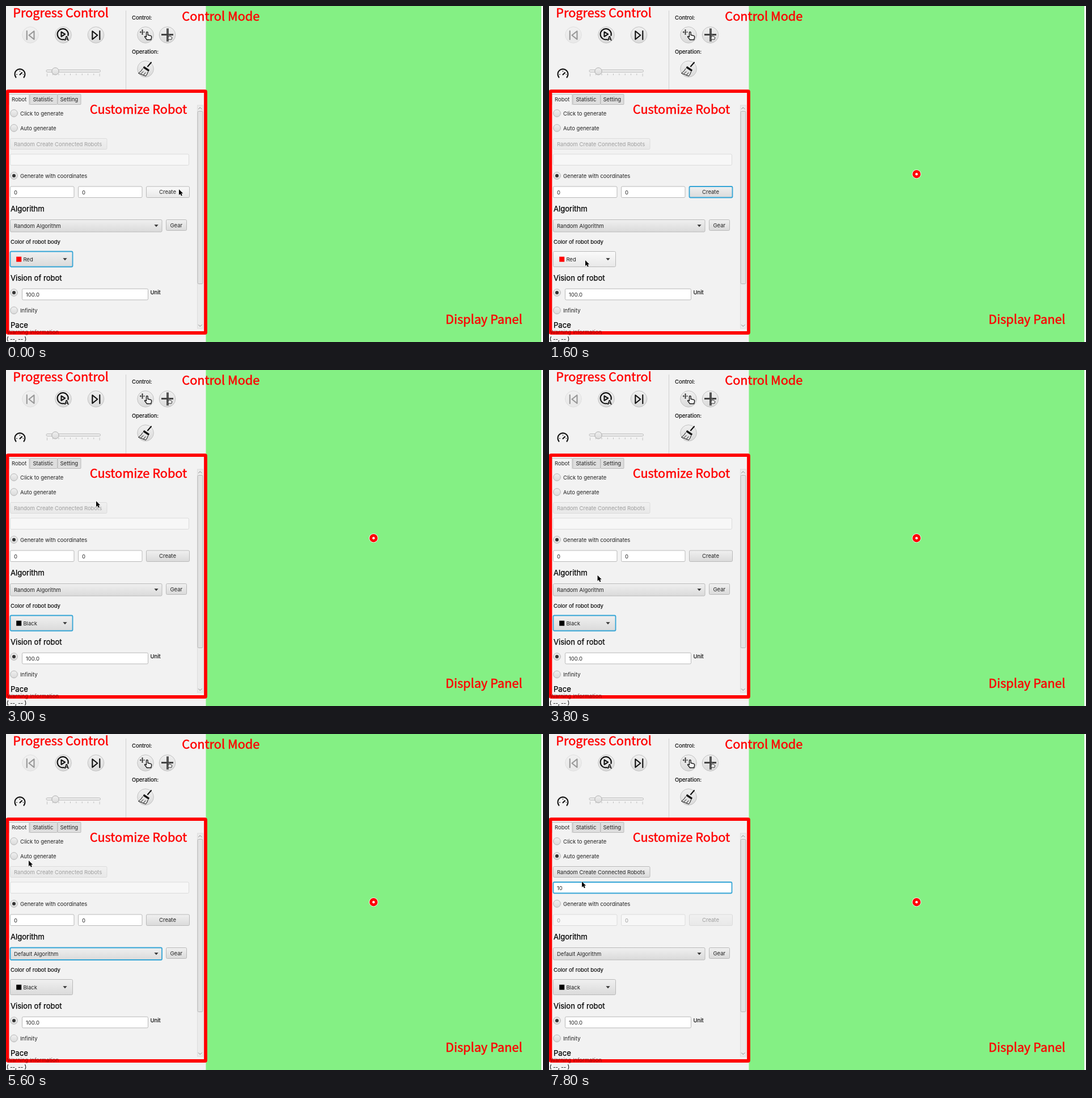
An HTML page for the animation above (8000 ms loop, 947 by 592 pixels).

```html
<!DOCTYPE html>
<html lang="en">
<head>
<meta charset="utf-8">
<title>Robot control panel</title>
<style>
  html, body { margin: 0; width: 100%; height: 100%; overflow: hidden; background: #f2f2f2; }
  svg { display: block; width: 100%; height: 100%; }
  text { font: 9.5px Inter, Roboto, sans-serif; fill: #222; white-space: pre; }
  .label { fill: #000; stroke: #000; stroke-width: .15; }
  .head { font-size: 13.1px; fill: #000; stroke: #000; stroke-width: .25; }
  .note { font: 21.7px "Noto Sans CJK SC", "Noto Sans CJK JP", "Noto Sans CJK", "Open Sans", sans-serif; fill: #f00; stroke: #f00; stroke-width: .5; }
  .mid { text-anchor: middle; }
  .off { opacity: .4; }
  .lit { fill: #fff; }
  .ink { fill: none; stroke: #111; stroke-width: 2.1; stroke-linejoin: round; stroke-linecap: round; }
  .thin { stroke-width: 1; }
  .pale { stroke: #888; stroke-width: 1; }
</style>
</head>
<body>
<svg viewBox="0 0 947 592">
  <defs>
    <linearGradient id="face" x2="0" y2="1"><stop stop-color="#f0f0f0"/><stop offset="1" stop-color="#dadada"/></linearGradient>
    <linearGradient id="hot" x2="0" y2="1"><stop stop-color="#fafafa"/><stop offset="1" stop-color="#e8e8e8"/></linearGradient>
    <linearGradient id="down" x2="0" y2="1"><stop stop-color="#e2e2e2"/><stop offset="1" stop-color="#d0d0d0"/></linearGradient>
    <linearGradient id="popup" x2="0" y2="1"><stop stop-color="#f6f6f6"/><stop offset=".6" stop-color="#ececec"/><stop offset=".75" stop-color="#f5f5f5"/><stop offset="1" stop-color="#e2e2e2"/></linearGradient>
    <filter id="shade" x="-10%" y="-10%" width="125%" height="125%"><feDropShadow dx="0" dy="2" stdDeviation="3" flood-opacity=".4"/></filter>
  </defs>
  <g id="base"></g>
  <g id="form"></g>
  <g id="robot">
    <circle cx="648.2" cy="296.2" r="8" fill="#fff"/>
    <circle cx="648.2" cy="296.2" r="7.2" fill="#f00"/>
    <circle cx="648.2" cy="296.2" r="2.2" fill="#fff"/>
  </g>
  <g id="notes"></g>
  <path id="cursor" d="M0 0V10L2.3 7.9L4 11.6L5.8 10.8L4.2 7.2H7.2Z" fill="#000" stroke="#fff" stroke-width=".8" paint-order="stroke"/>
</svg>
<script>
const STEP = 200, LOOP = 8000;
const $ = id => document.getElementById(id);

const text = (s, x, y, cls = '') => `<text x="${x}" y="${y}" class="${cls}">${s}</text>`;
const rect = (x, y, w, h, fill, stroke = 'none', r = 0, width = 1) =>
  `<rect x="${x}" y="${y}" width="${w}" height="${h}" rx="${r}" fill="${fill}" stroke="${stroke}" stroke-width="${width}"/>`;
const disc = (x, y, r, fill, stroke = 'none') => `<circle cx="${x}" cy="${y}" r="${r}" fill="${fill}" stroke="${stroke}"/>`;
const path = (d, cls = 'ink') => `<path d="${d}" class="${cls}"/>`;
const group = (s, off) => `<g class="${off ? 'off' : ''}">${s}</g>`;
const times = (n, fn) => Array.from({ length: n }, (_, i) => fn(i)).join('');

const box = (x, y, w, h, fill, focus) => focus
  ? rect(x, y, w, h, fill, '#35a5d6', 2, 1.8)
  : rect(x, y, w, h, fill, '#b9b9b9', 2);
const field = (x, y, w, s, focus) => box(x, y, w, 19.5, '#fff', focus) + text(s, x + 6.5, y + 13.5);
const radio = (y, s, on) => disc(14, y, 6.3, 'url(#face)', '#b5b5b5') + (on ? disc(14, y, 3, '#333') : '') + text(s, 25, y + 3.5);
const arrow = (x, y) => `<path d="M${x - 3.6} ${y - 1.8}h7.2l-3.6 4z" fill="#333"/>`;
const knob = (x, y) => disc(x, y, 14.3, 'url(#face)', '#c2c2c2');
const hand = (x, y, size) => `<g transform="translate(${x} ${y}) scale(${size})"><path
  d="M-2 1V-5.5q1.3-1.8 2.6 0V-1l5 1.4q2 .6 1.6 2.6l-1 4.5H-1l-4-5.2q0-2 3 .2z"
  fill="#f4f4f4" stroke="#111" stroke-width="1.3" stroke-linejoin="round"/></g>`;

function drawPlayback() {
  return group(knob(43, 51) + path('M36.8 44V59M49.5 44.3V58.7L40.5 51.5Z'), true)
    + knob(101, 51) + path('M102.5 59A9.6 9.6 0 1 1 109.5 52M97.5 45.7V53.8L104.2 49.7Z')
    + `<text x="102.8" y="61" style="font-size:11px;font-weight:700;fill:#111">A</text>`
    + knob(158.5, 51) + path('M152.3 44.3V58.7L161.3 51.5Z') + path('M165.3 44V59')
    + path('M17.5 125.8A9 9 0 1 1 31.5 125.8') + path('M24.5 121L28 117.5')
    + path('M24.5 114.5v1M18.5 120.5h1M30 120.5h.8', 'ink thin')
    + rect(71, 112.5, 95.5, 4, '#ededed', '#bcbcbc', 2)
    + times(10, i => rect(72 + i * 10.3, 119, .8, i % 9 ? 3 : 5, '#b5b5b5'))
    + disc(87, 115, 6.2, 'url(#face)', '#acacac');
}

function drawModes() {
  return text('Control:', 222, 24, 'label') + text('Operation:', 222, 84, 'label')
    + knob(246, 51) + knob(284.5, 51) + knob(246, 111)
    + path('M240.5 42V50M236.5 46H244.5M239.4 43l1.1-1.2 1.1 1.2M239.4 49l1.1 1.2 1.1-1.2M237.5 44.9L236.3 46l1.2 1.1', 'ink thin')
    + hand(249.5, 52, 1)
    + `<path d="M285 39.5V62.5" stroke="#555" stroke-width="4"/><path d="M274 50.5H295" stroke="#444" stroke-width="3"/>`
    + hand(288, 54, .65)
    // broom: handle, collar, bristles
    + path('M256 99.5L250 106.5') + `<path d="M243.5 106L253 112.5L251.5 115.5L241.5 109Z" fill="#111"/>`
    + path('M241 110.5Q238.5 115.5 233.5 118.5L246.5 123.5Q249.5 120 250.5 116M238 119.5L242 115.5M242.5 121.5L246 117.5', 'ink thin');
}

function drawPanel() {
  return rect(42, 155.5, 48.5, 18, '#dedede', '#b9b9b9', 1) + rect(91, 155.5, 41, 18, '#dedede', '#b9b9b9', 1)
    + `<path d="M5 174V155.5H41V174" fill="#f2f2f2" stroke="#bdbdbd"/>`
    + text('Robot', 10, 168) + text('Statistic', 47.5, 168) + text('Setting', 95.5, 168)
    + rect(337.5, 175, 10, 393, '#ebebeb', '#dcdcdc') + rect(338, 185.5, 9, 304, '#e2e2e2', '#b8b8b8', 2)
    + path('M339.5 181.5l2.8-2.8 2.8 2.8M339.5 561.8l2.8 2.8 2.8-2.8', 'ink pale')
    + text('Algorithm', 8, 361.5, 'head') + text('Color of robot body', 8, 418.7, 'label')
    + text('Vision of robot', 8, 483.8, 'head') + radio(505, '', true)
    + field(28.5, 498.3, 222, '100.0') + text('Unit', 254.5, 508, 'label') + radio(536.3, 'Infinity')
    + text('Pace', 8, 566.7, 'head') + text('( --, -- )', 1, 590, 'label');
}

function drawBase() {
  return rect(352.5, 0, 591.5, 592, '#84f084') + rect(944, 0, 3, 592, '#fafafa')
    + rect(211, 8, 1, 139, '#cfcfcf') + drawPlayback() + drawModes() + drawPanel();
}

function drawNotes() {
  return rect(2.5, 150.2, 349.5, 425.8, 'none', '#f00', 1, 5.8)
    + `<text x="2" y="577.5" style="fill:#500;opacity:.65">Warning Information</text>`
    + text('Progress Control', 12.3, 20, 'note') + text('Control Mode', 310.3, 25.5, 'note')
    + text('Customize Robot', 147.8, 189.5, 'note') + text('Display Panel', 775, 559.5, 'note');
}

// Palette: one gray row, then each hue lightened row by row.
const HUES = ['0,51,51', '0,26,128', '26,0,104', '51,0,51', '77,0,26', '153,0,0',
  '153,51,0', '153,77,0', '153,102,0', '153,153,0', '102,102,0', '0,51,0'];
const PITCH = 11.87, LEFT = 18, TOP = 226.5;
const shade = (row, col) => {
  const lift = 204 * ((row - 1) / 8) ** 1.2;
  const rgb = row ? HUES[col].split(',').map(v => Math.min(255, +v + lift))
    : Array(3).fill(255 * (1 - col / 11));
  return `rgb(${rgb.map(Math.round)})`;
};

function drawPicker(hover) {
  const row = Math.floor((hover.y - TOP) / PITCH), col = Math.floor((hover.x - LEFT) / PITCH);
  const inside = row >= 0 && row < 10 && col >= 0 && col < 12;
  return `<g filter="url(#shade)">${rect(8, 217, 161, 215.5, 'url(#popup)', '#b5b5b5', 3)}</g>`
    + times(120, i => {
      const r = Math.floor(i / 12), c = i % 12;
      return rect(LEFT + c * PITCH, TOP + r * PITCH, PITCH - .9, PITCH - .9, shade(r, c));
    })
    + (inside ? rect(LEFT + (col + .5) * PITCH - 9, TOP + (row + .5) * PITCH - 9, 17.5, 17.5, shade(row, col), '#1f8fd0', 0, 1.8) : '')
    + text('Custom Colors', 17, 363)
    + times(12, i => rect(LEFT + i * PITCH, 375, PITCH - .9, 11, i ? '#fff' : '#f00'))
    + rect(17, 394.5, 142, 1, '#c8c8c8')
    + text('Custom Color...', 88, 417.5, 'mid') + rect(53, 419, 70, .8, '#333');
}

const ALGORITHMS = ['SEC Formation', 'Default', 'Random Jump', 'Gathering', 'Random Choose', 'Random'];
function drawList(hover) {
  const row = Math.floor((hover.y - 399.3) / 18.5);
  return `<g filter="url(#shade)">${rect(8, 399, 266.5, 111.5, '#fff', '#bbb')}</g>`
    + ALGORITHMS.map((name, i) => {
      const on = i === row || i === 5, y = 399.3 + i * 18.5;
      return (on ? rect(8.3, y, 266, 18.5, '#048dcb') : '') + text(name + ' Algorithm', 12, y + 12.6, on ? 'lit' : '');
    }).join('');
}

// Pointer track: time, x, y
const TRACK = [[0, 305, 323], [600, 305, 323], [1400, 72, 440], [1600, 64, 448], [1800, 64, 448],
  [2000, 154, 315], [2200, 158, 297], [2600, 159, 234], [2800, 159, 231], [3200, 159, 231],
  [4000, 72, 386], [4200, 62, 388], [4400, 56, 421], [4600, 55, 424.5], [4800, 55, 424.5],
  [5600, 40, 223], [6000, 15, 214], [6200, 15, 214], [6800, 60, 268], [7200, 60, 268], [7800, 58, 260]];

function pointer(t) {
  const i = Math.max(1, TRACK.findIndex(p => p[0] >= t));
  const [t0, x0, y0] = TRACK[i - 1], [t1, x1, y1] = TRACK[i];
  const k = Math.max(0, (t - t0) / (t1 - t0)), e = k * k * (3 - 2 * k);
  return { x: x0 + (x1 - x0) * e, y: y0 + (y1 - y0) * e };
}

function focusAt(t) {
  if (t < 400) return 'color';
  if (t < 1800) return 'create';
  if (t < 4200) return 'color';
  if (t < 6200) return 'algorithm';
  return t < 7000 ? 'auto' : 'count';
}

function drawForm(t, at) {
  const focus = focusAt(t), auto = t >= 6200, black = t >= 3000;
  const open = t >= 1800 && t < 3000 ? 'color' : t >= 4200 && t < 5000 ? 'algorithm' : '';
  const button = (x, y, w, h, id) => {
    const over = at.x > x && at.x < x + w && at.y > y && at.y < y + h;
    const look = open === id ? 'down' : over ? 'hot' : 'face';
    return box(x, y, w, h, `url(#${look})`, focus === id);
  };
  const count = t < 7200 ? '' : t < 7400 ? '1' : '10';
  return radio(189, 'Click to generate') + radio(215, 'Auto generate', auto)
    + group(button(7.5, 233.5, 170.5, 19, 'random') + text('Random Create Connected Robots', 14, 247), !auto)
    + group(field(7.5, 261, 315, count, focus === 'count'), !auto)
    + radio(299, 'Generate with coordinates', !auto)
    + group(field(7.5, 318, 112.5, '0') + field(127.5, 318, 112.5, '0')
      + button(247.5, 318, 76, 19.5, 'create') + text('Create', 285, 331.3, 'mid'), auto)
    + button(7.5, 376.5, 267.5, 21.5, 'algorithm')
    + text((t < 5000 ? 'Random' : 'Default') + ' Algorithm', 14, 391) + arrow(265, 387)
    + button(282.5, 376.5, 36, 19, 'gear') + text('Gear', 300.3, 389.5, 'mid')
    + button(7.5, 432.5, 110, 27, 'color') + rect(18.2, 441.7, 9, 9, black ? '#000' : '#f00')
    + text(black ? 'Black' : 'Red', 30.4, 449.7) + arrow(104, 446)
    + (open === 'color' ? drawPicker(pointer(t - STEP)) : '')
    + (open === 'algorithm' ? drawList(at) : '');
}

let shown = -1;
function render(now) {
  const t = Math.floor(now % LOOP / STEP) * STEP;
  if (t !== shown) {
    shown = t;
    const at = pointer(t);
    $('form').innerHTML = drawForm(t, at);
    $('robot').style.display = t >= 400 ? '' : 'none';
    $('cursor').setAttribute('transform', `translate(${at.x} ${at.y})`);
  }
  requestAnimationFrame(tick);
}

$('base').innerHTML = drawBase();
$('notes').innerHTML = drawNotes();
const start = performance.now();
const tick = () => render(performance.now() - start);
tick();
</script>
</body>
</html>
```
